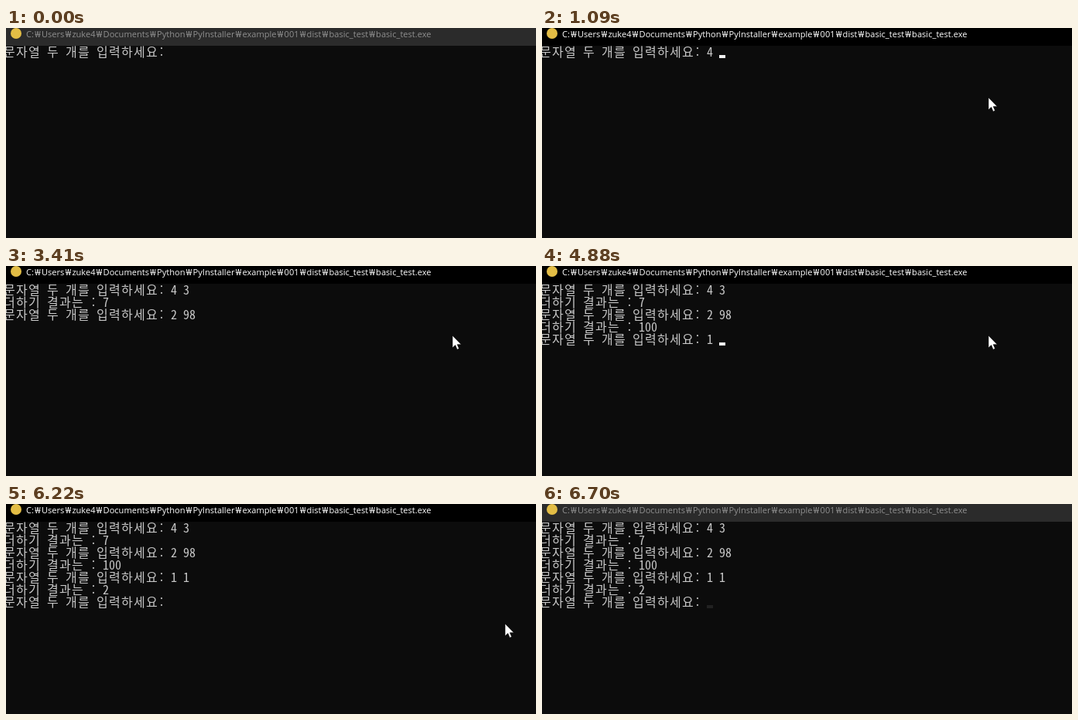
Animation of 685 by 272 pixels, one loop 6850 ms. Source, as an HTML page:

```html
<!DOCTYPE html>
<html lang="ko">
<head>
<meta charset="utf-8">
<title>basic_test.exe</title>
<style>
  html, body { margin: 0; width: 100%; height: 100%; overflow: hidden; background: #0c0c0c; }
  #stage { position: relative; width: 685px; height: 272px; overflow: hidden; background: #0c0c0c; }
  #bar {
    position: absolute; left: 0; top: 0; width: 685px; height: 23px;
    font: 11.1px/16px "Open Sans", "Noto Sans", sans-serif; white-space: nowrap;
  }
  #bar::before {
    content: ""; position: absolute; left: 6px; top: 0; width: 14px; height: 14px;
    border-radius: 50%; background: #e3bd45;
  }
  #path { position: absolute; left: 26px; top: 0; }
  #path i { display: inline-block; width: 10px; text-align: center; font-style: normal; }
  svg { position: absolute; left: 0; top: 0; }
  #lines text {
    font: 16px "Noto Sans Mono CJK KR", "Noto Sans CJK KR", "Noto Sans Mono", monospace;
    fill: #c8c8c8;
  }
</style>
</head>
<body>
<div id="stage">
  <div id="bar"><span id="path"></span></div>
  <svg width="685" height="272" viewBox="0 0 685 272">
    <g id="lines"></g>
    <rect id="caret" width="8" height="4"/>
    <g id="pointer">
      <circle id="halo" cx="-1" cy="-2" fill="#807c06"/>
      <path d="M0 0V16L3.7 12.6L6.1 18.2L8.6 17.1L6.3 11.7H11.4Z" fill="#fff" stroke="#000" stroke-width=".6"/>
    </g>
  </svg>
</div>
<script>
const LOOP = 6850, CELL = 8, ROW = 16, LEFT = -3, TOP = 23;
const ASK = '문자열 두 개를 입력하세요:', SUM = '더하기 결과는 : ';
const $ = id => document.getElementById(id);

const folders = ['C:', 'Users', 'zuke4', 'Documents', 'Python', 'PyInstaller',
  'example', '001', 'dist', 'basic_test', 'basic_test.exe'];
$('path').innerHTML = folders.join('<i>₩</i>');

// time, row, column, text
const prints = [
  [0, 0, 0, ASK], [810, 0, 27, '4'], [1360, 0, 29, '3'],
  [1690, 1, 0, SUM + '7'], [1690, 2, 0, ASK], [2950, 2, 27, '2'], [3410, 2, 29, '98'],
  [3940, 3, 0, SUM + '100'], [3940, 4, 0, ASK], [4750, 4, 27, '1'], [5010, 4, 29, '1'],
  [5220, 5, 0, SUM + '2'], [5220, 6, 0, ASK]
].map(([at, row, col, str]) => {
  const el = document.createElementNS('http://www.w3.org/2000/svg', 'text');
  const xs = [];
  for (const ch of str) {
    xs.push(LEFT + col * CELL);
    col += ch > '\u1100' ? 2 : 1;
  }
  el.setAttribute('x', xs.join(' '));
  el.setAttribute('y', TOP + row * ROW + 14);
  el.textContent = str;
  $('lines').append(el);
  return { at, el };
});

// time, row, column, colour; time alone hides the caret
const WHITE = '#f2f2f2';
const carets = [
  [0], [1090, 0, 29, WHITE], [1360], [1690, 2, 27, WHITE], [2420],
  [2950, 2, 28, WHITE], [3140, 2, 29, WHITE], [3410],
  [3940, 4, 27, WHITE], [4490], [4750, 4, 28, WHITE], [4880, 4, 29, WHITE],
  [5010], [5080, 4, 30, WHITE], [5220], [5280, 6, 27, WHITE], [6080],
  [6640, 6, 27, '#555'], [6700, 6, 27, '#222']
];

// time, tip x, tip y, click halo radius
const moves = [
  [0], [130, 594, 181, 0], [200, 578, 108, 0], [270, 577, 90, 12], [340, 577, 90, 7],
  [410, 577, 90, 0], [5810, 578, 90, 0], [6080, 587, 97, 0], [6150, 620, 126, 0],
  [6220, 645, 155, 0], [6290, 651, 195, 0], [6360, 653, 232, 0], [6430, 653, 258, 0], [6570]
];

// time, bar colour, title colour
const focus = [
  [0, '#2b2b2b', '#8f8f8f'], [270, '#000', '#fff'],
  [6570, '#111', '#d2d2d2'], [6640, '#202020', '#aaa'], [6700, '#2b2b2b', '#8f8f8f']
];

const current = (list, t) => list.findLast(step => step[0] <= t);
const show = (el, on) => el.setAttribute('visibility', on ? 'visible' : 'hidden');

function draw(now) {
  const t = now % LOOP;
  for (const p of prints) show(p.el, t >= p.at);

  const [, row, col, ink] = current(carets, t);
  show($('caret'), ink);
  if (ink) {
    $('caret').setAttribute('x', LEFT + col * CELL);
    $('caret').setAttribute('y', TOP + row * ROW + 12);
    $('caret').setAttribute('fill', ink);
  }

  const [, x, y, r] = current(moves, t);
  show($('pointer'), x);
  if (x) {
    $('pointer').setAttribute('transform', `translate(${x} ${y})`);
    $('halo').setAttribute('r', r);
  }

  const [, back, text] = current(focus, t);
  $('bar').style.background = back;
  $('bar').style.color = text;
}

const start = performance.now();
function tick() {
  draw(performance.now() - start);
  requestAnimationFrame(tick);
}
tick();
</script>
</body>
</html>
```
